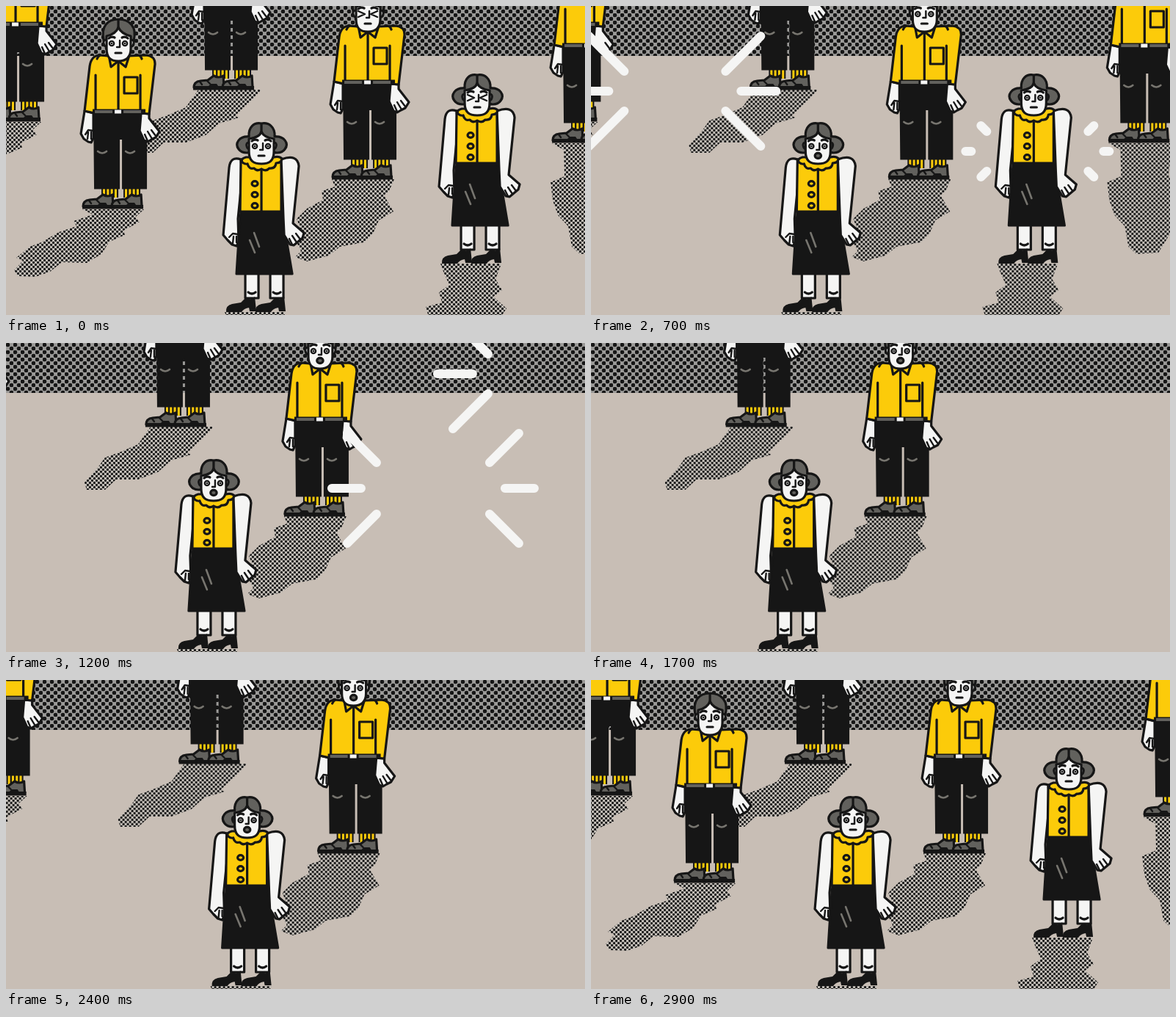
Recreate the animation shown at these times as an HTML page. Size 789 px wide and 421 px high, loop 3000 ms.

```html
<!DOCTYPE html>
<html lang="en">
<head>
<meta charset="utf-8">
<title>Vanishing crowd</title>
<style>
  html, body { margin: 0; width: 100%; height: 100%; overflow: hidden; background: #c8beb5; }
  svg { display: block; width: 789px; height: 421px; }
  .ink { stroke: #161616; stroke-width: 3.2; stroke-linejoin: round; stroke-linecap: round; }
  .line { fill: none; }
  .skin { fill: #f5f5f4; }
  .cloth { fill: #fccb0a; }
  .dark { fill: #161616; }
  .gray { fill: #62615d; }
  .mark { fill: none; stroke: #77756f; stroke-width: 2.6; stroke-linecap: round; }
  .thin { stroke-width: 2.4; }
  .ray { stroke: #f5f5f4; stroke-width: 12; stroke-linecap: round; }
</style>
</head>
<body>
<svg id="stage" viewBox="0 0 789 421">
  <defs>
    <pattern id="coarse" width="10" height="10" patternUnits="userSpaceOnUse">
      <rect width="10" height="10" fill="#9b9a98"/>
      <path d="M2.5 2.5h0M7.5 7.5h0" stroke="#161616" stroke-width="5.6" stroke-linecap="round"/>
    </pattern>
    <pattern id="fine" width="6" height="6" patternUnits="userSpaceOnUse">
      <rect width="6" height="6" fill="#c6c1ba"/>
      <path d="M1.5 1.5h0M4.5 4.5h0" stroke="#161616" stroke-width="3.3" stroke-linecap="round"/>
    </pattern>
  </defs>
  <rect width="789" height="421" fill="#c8beb5"/>
  <rect width="789" height="68" fill="url(#coarse)"/>
  <g id="scene"></g>
</svg>
<script>
const LOOP = 3000, STEP = 100, RETURN = 2700;
const shape = (cls, d) => `<path class="${cls}" d="${d}"/>`;
const ink = (cls, d) => shape('ink ' + cls, d);

// Features around the face centre line; y is the eye level.
function features(x, y) {
  const eye = s => `<circle class="ink skin thin" cx="${x + 9 * s}" cy="${y}" r="3.1"/>
    <circle class="dark" cx="${x + 9 * s}" cy="${y}" r="1.3"/>`;
  return ink('line', `M${x - 13} ${y - 7}q4 -3 8 -1M${x + 5} ${y - 8}q4 -2 8 1`) +
    ink('line thin', `M${x + 2} ${y - 4}v9h-4`) +
    `<g class="open">${eye(-1)}${eye(1)}</g>
     <g class="shut">${ink('line thin', `M${x - 13} ${y - 4}l9 4l-9 4M${x + 13} ${y - 4}l-9 4l9 4`)}</g>
     <g class="calm">${ink('line', `M${x - 4} ${y + 13}h8`)}</g>
     <g class="gasp"><ellipse class="ink gray" cx="${x}" cy="${y + 13}" rx="4.2" ry="3.6"/></g>`;
}

const shoe = x => ink('gray', `M${x} 273Q${x} 265 ${x + 9} 264L${x + 19} 263L${x + 27} 257Q${x + 34} 261 ${x + 40} 257L${x + 41} 273Z`) +
  shape('dark', `M${x - 1} 271h21l3 -3h8l2 3h10v5.5h-44z`) +
  ink('line thin', `M${x + 18} 264l4 4M${x + 8} 265l3 4`);

const sock = x => shape('dark', `M${x} 246h23v15h-23z`) +
  `<path d="M${x + 3.5} 249v12m5.3 -12v12m5.3 -12v12m5.3 -12v12" stroke="#fccb0a" stroke-width="3"/>`;

function man() {
  return sock(130) + sock(160) + shoe(105) + shoe(144) +
    shape('dark', 'M119 144H192V249.5H158V182H155V249.5H120Z') +
    shape('mark', 'M125 198q6 5 12 0M163 198q6 5 12 0') +
    ink('skin', 'M107 143L102 174L106 181L112 185L116 186L119 180V146Z') +
    ink('line thin', 'M119 170l-7 -1l-4 6M112 172l-1 9M116 172v9') +
    ink('skin', 'M184 146L182 170L188 183L193 185L198 182L204 179L209 171L195 153V147Z') +
    ink('line thin', 'M189 175l4 9M193 171l6 10M198 169l6 8') +
    ink('cloth', 'M139 68L127 67Q116 68 114 82L107 143L121 146H183L195 147L203 79Q203 68 191 67L168 68Z') +
    ink('line', 'M122 94V144M183 94V144M153 78V144M161 97h18v22h-18zM128 67q-3 2 -4 5M180 67q4 1 5 5') +
    shape('dark', 'M118 140.5H190V147.5H118Z') +
    shape('gray', 'M121 142H145V146H121ZM160 142H184V146H160Z') +
    shape('skin', 'M148 141.5h9v5h-9z') +
    ink('cloth', 'M140 67L143 83L153 75L163 83L168 67Z') +
    ink('gray', 'M133 47C129 28 138 18 153 18C168 18 179 28 174 47Z') +
    ink('skin', 'M137 46q-5 0 -4 5q1 5 5 4M170 46q5 0 4 5q-1 5 -5 4') +
    ink('skin', 'M137 41Q150 38 153 29Q157 38 170 41V58C170 70 164 75 153 75C142 75 137 70 137 58Z') +
    ink('line', 'M153 19V30') + features(153, 51);
}

const leg = x => ink('skin', `M${x} 364h18v34h-18z`) + ink('line', `M${x + 4} 390q5 4 10 0`);
const pump = x => shape('dark', `M${x} 417Q${x - 1} 408 ${x + 8} 406L${x + 20} 404L${x + 27} 397Q${x + 34} 402 ${x + 39} 396L${x + 41} 416H${x + 32}L${x + 31} 411Q${x + 24} 412 ${x + 21} 417Z`);
const button = y => `<ellipse class="ink cloth" cx="339" cy="${y}" rx="4" ry="3.4"/>`;

function woman() {
  return leg(326) + leg(360) + pump(300) + pump(340) +
    ink('skin', 'M320 209Q306 204 304 220L296 312L302 319L308 325L314 327L317 321L316 290L322 230Z') +
    ink('line thin', 'M316 311l-7 -1l-5 5M310 314l-1 9M314 314v8') +
    ink('dark', 'M320 280H375L380 306L390 365H314L318 302Z') +
    shape('mark', 'M332 319l7 17M338 309l7 19') +
    ink('cloth', 'M320 209L319 280H375V209Z') +
    ink('line', 'M348 222V280') + button(242) + button(257) + button(272) +
    ink('skin', 'M375 209Q397 201 399 218L391 296L406 309L404 316L398 321L392 326L387 325L379 312L378 290Z') +
    ink('line thin', 'M386 317l4 8M390 313l6 9M395 310l6 8') +
    ink('cloth', 'M327 206Q319 208 322 213Q326 216 329 215Q331 223 338 221Q342 226 348 222Q354 226 359 221Q367 222 368 214Q375 214 376 208Q372 204 365 206Z') +
    ink('gray', 'M348 160C338 158 330 165 331 178C318 177 311 187 317 195C322 202 334 201 338 196H359C364 201 375 202 380 195C386 187 379 177 366 178C367 165 358 158 348 160Z') +
    ink('skin', 'M331 186q-4 0 -3 5q1 5 5 3M365 186q4 0 3 5q-1 5 -5 3') +
    ink('skin', 'M331 181Q346 179 348 171Q351 179 365 181V198C365 211 359 215 348 215C337 215 331 211 331 198Z') +
    ink('line', 'M348 161V172') + features(348, 191);
}

const manShade = 'M104 277H188L176 288L182 294L160 306L162 312L141 321L130 338L110 350L76 349L60 362L40 369L16 368L11 360L23 347L14 343L32 328L48 322L72 308L96 300L92 293L118 284Z';
const womanShade = 'M298 417H381L373 438L382 453L370 462L388 478L380 490H282L278 476L300 470L296 456L310 446L302 428Z';

// gone: when the burst starts; gasp: when the mouth opens.
const people = [
  { draw: man, x: 151, y: -162, shade: 'M111 276H197L184 290L175 298L161 312L167 314L139 322L121 338L94 348L64 348L49 362L24 362L21 352L39 332L49 318L71 310L94 300Z' },
  { draw: man, x: -140, y: -119, shade: manShade },
  { draw: man, x: 640, y: -90, gone: 1000, hub: [791, 42],
    shade: 'M104 277H190L186 320L192 340L188 400L172 426L142 428L131 418L126 390L112 375L105 355L102 330L121 322L120 286Z' },
  { draw: man, x: 340, y: -40, shut: true, gasp: 800,
    shade: 'M104 276H189L182 292L175 298L188 320L168 332L160 350L148 362L115 368L100 380L70 388L54 382L62 374L55 360L60 340L56 330L70 316L92 304L90 292L108 286Z' },
  { draw: man, x: 0, y: 0, gone: 500, hub: [153, 116], shade: manShade },
  { draw: woman, x: 294, y: -66, gone: 700, hub: [647, 198], shut: true, shade: womanShade },
  { draw: woman, x: 0, y: 0, gasp: 700, shade: womanShade }
];

const scene = document.getElementById('scene');
const place = (p, html) => `<g transform="translate(${p.x} ${p.y})">${html}</g>`;
scene.innerHTML =
  people.map(p => place(p, `<path class="shade" fill="url(#fine)" d="${p.shade}"/>`)).join('') +
  people.map(p => place(p, `<g class="body">${p.draw()}</g>`)).join('') +
  people.map(() => '<path class="ray"/>').join('');

const all = sel => scene.querySelectorAll(sel);
const show = (el, on) => { el.style.display = on ? '' : 'none'; };
const shades = all('.shade'), bodies = all('.body'), rays = all('.ray');

// Camera pan: a slow swing left, then a quicker one back.
function pan(t) {
  const deg = t < 1500 ? 40 + t / 12 : 180 + (t - 1500) * 0.12;
  return -32.5 + 42.5 * Math.cos(deg * Math.PI / 180);
}

// Near and far end of the rays, one pair per step.
const spans = [[90, 98], [90, 122], [90, 138], [90, 138], [90, 138], [98, 138], [122, 138]];

function burst([x, y], [a, b]) {
  let d = '';
  for (const sx of [-1, 1]) {
    d += `M${x + sx * a} ${y}H${x + sx * b}`;
    for (const sy of [-1, 1])
      d += `M${x + sx * (a - 21)} ${y + sy * (a - 63)}L${x + sx * (b - 21)} ${y + sy * (b - 63)}`;
  }
  return d;
}

function render(now) {
  const t = Math.floor(now % LOOP / STEP) * STEP;
  scene.setAttribute('transform', `translate(${pan(t).toFixed(2)} 0)`);
  people.forEach((p, i) => {
    const k = (t - p.gone) / STEP;
    const here = !(k >= 2 && t < RETURN);
    show(shades[i], here);
    show(bodies[i], here);
    const span = spans[k];
    rays[i].setAttribute('d', span ? burst(p.hub, span) : '');
    const shut = !!p.shut && t < 200;
    const gasp = t >= p.gasp && t < RETURN;
    const part = (name, on) => show(bodies[i].querySelector(name), on);
    part('.open', !shut);
    part('.shut', shut);
    part('.gasp', gasp);
    part('.calm', !gasp);
  });
}

const start = performance.now();
function tick() {
  render(performance.now() - start);
  requestAnimationFrame(tick);
}
tick();
</script>
</body>
</html>
```
